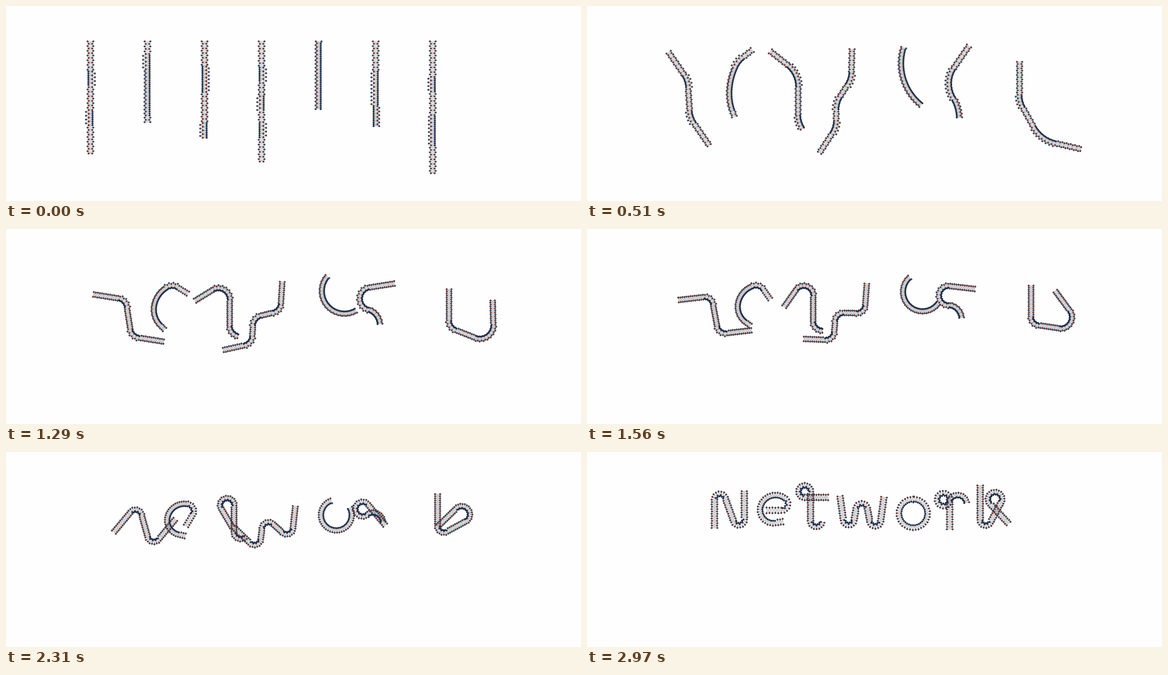
An HTML page with a canvas that plays this animation: 1280x435 px, repeating every 3000 ms.

```html
<!DOCTYPE html>
<html lang="en">
<head>
<meta charset="utf-8">
<title>Folding chains</title>
<style>
html, body { margin: 0; width: 100%; height: 100%; overflow: hidden; background: #fefefe; }
canvas { display: block; }
</style>
</head>
<body>
<canvas id="stage" width="1280" height="435"></canvas>
<script>
const LOOP = 3000, TICK = 30, TOP = 79, FIRST_X = 188, GAP = 127;
const STRAIGHT_STEP = 5.2, BEND_STEP = 4.2;
const RED = '#dc4a38', BLUE = '#4a76c4', DEEP = '#1f4494';
const RAD = Math.PI / 180;
const ctx = document.getElementById('stage').getContext('2d');
const chains = [];

// lens: straight, bend, straight, ... straight; heads: final heading of each straight (0 is down)
// path: Bezier points that the chain's middle follows; grow: final length factor
function addChain(lens, heads, path, grow = 1) {
  const total = lens.reduce((a, b) => a + b);
  let from = 0;
  const parts = lens.map((len, i) => {
    const a = heads[i >> 1], b = heads[(i + 1) >> 1];
    const part = { len, a, b, from, turn: (b - a) / (len || 1) };
    from += len;
    return part;
  });
  const start = [FIRST_X + GAP * chains.length, TOP + total / 2];
  chains.push({ parts, total, path: [start, ...path], grow, rungs: placeRungs(parts) });
}

function placeRungs(parts) {
  const rungs = [{ s: 0, turn: parts[0].turn }];
  for (const { len, from, turn } of parts) {
    const n = Math.round(len / (turn ? BEND_STEP : STRAIGHT_STEP));
    for (let k = 1; k <= n; k++) rungs.push({ s: from + len * k / n, turn });
  }
  return rungs;
}

addChain([63, 34, 56, 34, 63], [180, 20, 180], [[311, 222], [317, 128.5]]);
addChain([28, 30, 0, 55, 0, 52, 15], [-270, -130, -22, 98], [[325, 160], [406.5, 99.5]], 1.17);
addChain([52, 61, 65, 37, 0], [270, 0, 166], [[534, 158], [496.5, 83]]);
addChain([54, 34, 30, 35, 27, 34, 54], [-8, -169, -10, -172], [[527, 224], [613, 115.5]]);
addChain([0, 151, 0], [-90, 267], [[723.5, 182], [725.5, 168]], 1.28);
addChain([63, 77, 0, 49, 0], [-180, 162, 10], [[770, 150], [783.5, 97.5]], 1.05);
addChain([79, 33, 52, 68, 62], [0, 152, 403], [[1018, 326], [1120, 155], [914, 127]], 0.97);

function bezier(points, u) {
  while (points.length > 1) {
    points = points.slice(1).map((q, i) => q.map((v, c) => points[i][c] * (1 - u) + v * u));
  }
  return points[0];
}

// point and heading at rest length s, with all headings scaled by fold
function trace(parts, fold, s) {
  let x = 0, y = 0, a = parts[0].a * fold * RAD;
  for (const part of parts) {
    const l = Math.min(s - part.from, part.len);
    if (l <= 0) continue;
    const bend = part.turn * l * fold * RAD;
    if (Math.abs(bend) < 1e-4) {
      x += l * Math.sin(a);
      y += l * Math.cos(a);
    } else {
      const r = l / bend;
      x += r * (Math.cos(a) - Math.cos(a + bend));
      y += r * (Math.sin(a + bend) - Math.sin(a));
    }
    a += bend;
  }
  return { x, y, a };
}

function makeNode(p, turn, side, k, u) {
  const wide = k % 2 === 0;
  const outer = -Math.sign(turn) * side;
  const sharp = Math.max(0, Math.min(1, (Math.abs(turn) - 2) / 2.7));
  let off = wide ? 6.4 - 4 * u * (1 - u) : 4.2 + 1.6 * u;
  let fill = wide ? BLUE : RED;
  if (outer > 0 && wide) off += 3.5 * sharp * (1 - u);
  if (outer < 0) {
    off = wide ? 4.7 : 4.7 - 2.6 * u * sharp;
    fill = DEEP;
  }
  if (k === 0) fill = side < 0 ? RED : BLUE;
  return { x: p.x + side * off * Math.cos(p.a), y: p.y - side * off * Math.sin(p.a), fill };
}

function drawChain({ parts, total, path, grow, rungs }, u) {
  const fold = u + .2 * u * (1 - u) ** 3;
  const scale = 1 + (grow - 1) * u * u - .5 * u * (1 - u);
  const mid = trace(parts, fold, total / 2);
  const [cx, cy] = bezier(path, u);
  const rows = rungs.map(({ s, turn }, k) => {
    const { x, y, a } = trace(parts, fold, s);
    const p = { x: cx + (x - mid.x) * scale, y: cy + (y - mid.y) * scale, a };
    return [-1, 1].map(side => makeNode(p, turn, side, k, u));
  });

  ctx.beginPath();
  const line = (a, b) => { ctx.moveTo(a.x, a.y); ctx.lineTo(b.x, b.y); };
  rows.forEach(([left, right], k) => {
    line(left, right);
    const next = rows[k + 1];
    if (next) {
      line(left, next[1]);
      line(right, next[0]);
    }
  });
  ctx.strokeStyle = 'rgba(70,70,70,.7)';
  ctx.lineWidth = .6;
  ctx.stroke();

  ctx.strokeStyle = '#111';
  ctx.lineWidth = 1;
  for (const n of rows.flat()) {
    ctx.beginPath();
    ctx.arc(n.x, n.y, 1.7, 0, 2 * Math.PI);
    ctx.fillStyle = n.fill;
    ctx.fill();
    ctx.stroke();
  }
}

function draw() {
  const t = Math.floor(performance.now() % LOOP / TICK) * TICK;
  ctx.fillStyle = '#fefefe';
  ctx.fillRect(0, 0, 1280, 435);
  for (const chain of chains) drawChain(chain, t / (LOOP - TICK));
  requestAnimationFrame(draw);
}
draw();
</script>
</body>
</html>
```
